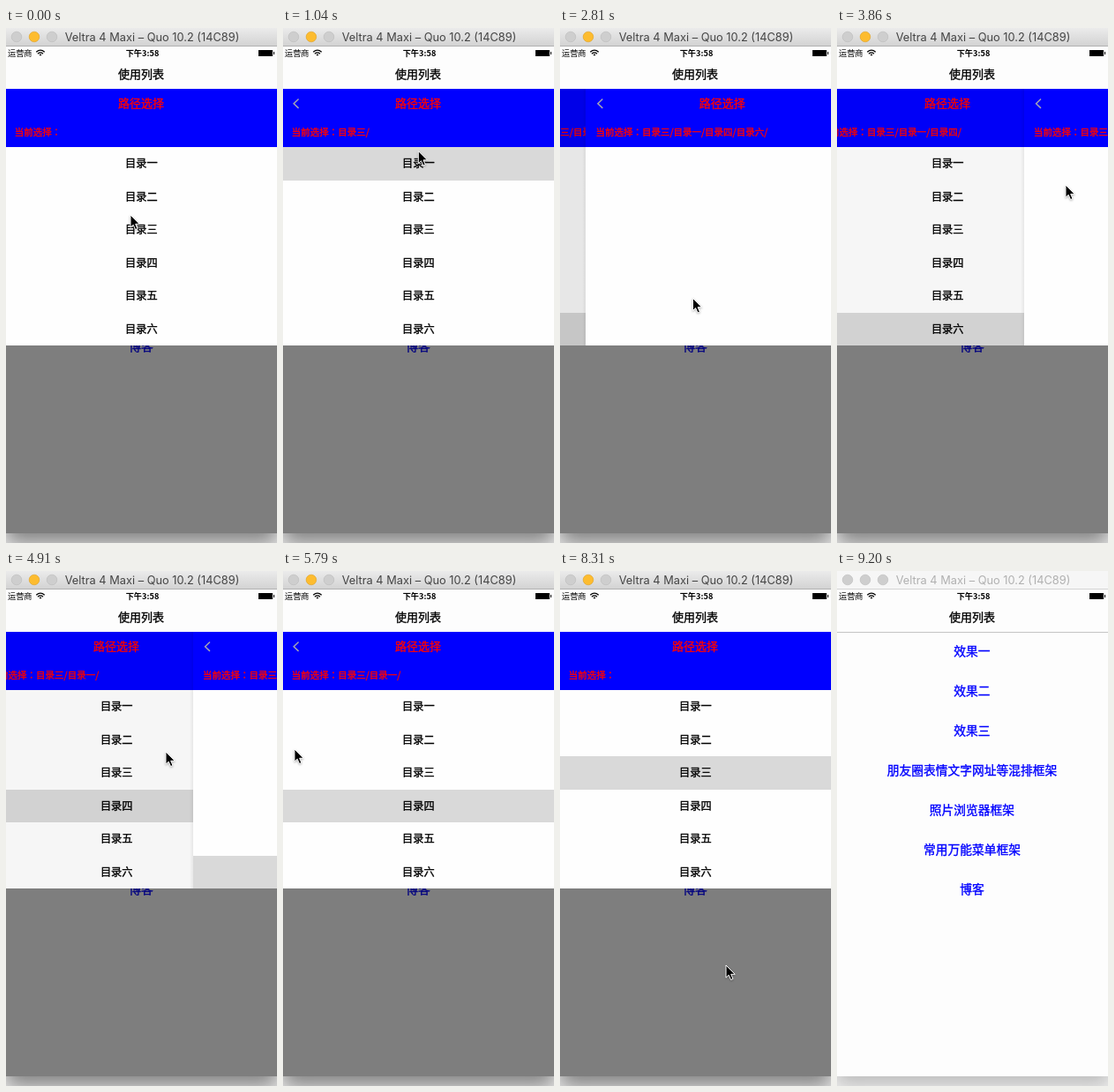
These frames come from a looping animation (307x584 px, 9300 ms). An HTML page:

```html
<!DOCTYPE html>
<html lang="zh-CN">
<head>
<meta charset="utf-8">
<style>
html, body { margin: 0; width: 100%; height: 100%; overflow: hidden; background: #ececec; }
#win { position: absolute; width: 307px; height: 573px; background: #fdfdfd; box-shadow: 0 11px 22px rgba(0,0,0,.46); }
#win.idle { box-shadow: 0 8px 20px rgba(0,0,0,.22); }
svg { position: absolute; left: 0; top: 0; }
rect { shape-rendering: crispEdges; }
text { font-family: "Noto Sans CJK SC", sans-serif; }
.mid { text-anchor: middle; }
.medium { stroke-width: .35; }
.title { font: 12.8px Inter, sans-serif; fill: #444; }
.idle .title { fill: #b0b0b0; }
.bar { fill: url(#chrome); }
.idle .bar { fill: #f6f6f6; }
.rim { fill: #b1b1b1; }
.idle .rim { fill: #d3d3d3; }
.dot { fill: #cecece; stroke: #bababa; stroke-width: .6; }
.min { fill: #fdbc2f; stroke: #e0a020; }
.idle .min { fill: #cecece; stroke: #bababa; }
#cursor { filter: drop-shadow(0 1px 1px rgba(0,0,0,.3)); }
</style>
</head>
<body>
<div id="win">
<svg width="307" height="584" viewBox="0 0 307 584">
  <defs>
    <linearGradient id="chrome" x2="0" y2="1"><stop stop-color="#ebebeb"/><stop offset="1" stop-color="#d3d3d3"/></linearGradient>
    <linearGradient id="edge"><stop stop-opacity="0"/><stop offset="1" stop-opacity=".06"/></linearGradient>
    <clipPath id="panel"><path d="M0 69H307V360H0Z"/></clipPath>
  </defs>

  <rect class="bar" width="307" height="20"/>
  <rect class="rim" y="20" width="307" height="1"/>
  <circle class="dot" cx="12" cy="10" r="5.8"/>
  <circle class="dot min" cx="32" cy="10" r="5.8"/>
  <circle class="dot" cx="52" cy="10" r="5.8"/>
  <text class="title mid" x="165.5" y="15">Veltra 4 Maxi – Quo 10.2 (14C89)</text>

  <text x="2" y="32.3" font-size="9.2">运营商</text>
  <g fill="none" stroke="#000" stroke-width="1.3">
    <path d="M34.3 27.3Q39 23 43.7 27.3M36 29.2Q39 26.6 42 29.2"/>
    <path d="M37.6 30.2Q39 29 40.4 30.2L39 31.8Z" fill="#000" stroke="none"/>
  </g>
  <text class="mid" x="154.5" y="32.2" font-size="9.2" font-weight="600">下午3:58</text>
  <rect x="286" y="25" width="16" height="7" rx="1"/>
  <rect x="303" y="27" width="1" height="3"/>
  <g id="list"></g>
  <rect y="69" width="307" height="1" fill="#c4c4c4"/>

  <g id="overlay">
    <path d="M0 69H307V573H0Z" fill-opacity=".5"/>
    <g id="pages" clip-path="url(#panel)"></g>
  </g>
  <path id="cursor" d="M0 0V14.2L3.2 11.2L5.6 16.6L8 15.5L5.7 10.3H10.2Z" stroke="#fff" stroke-width="1"/>
</svg>
</div>
<script>
const W = 307, TOP = 69, ROWS = 135, ROW = 37.5, LOOP = 9300, STEP = 148.5;
const $ = id => document.getElementById(id);
const label = (x, y, size, str, fill = '#000', cls = 'mid') =>
  `<text class="medium ${cls}" x="${x}" y="${y + size * .37}" font-size="${size}" fill="${fill}" stroke="${fill}">${str}</text>`;
const box = (y, h, attrs) => `<rect x="-1.5" y="${y}" width="310" height="${h}" ${attrs}/>`;

$('list').innerHTML = label(153, 52.4, 13, '使用列表') +
  ['效果一', '效果二', '效果三', '朋友圈表情文字网址等混排框架', '照片浏览器框架', '常用万能菜单框架', '博客']
    .map((s, i) => label(153, 91 + 45 * i, 13.75, s, '#00f')).join('');

const dirs = [...'一二三四五六'].map(n => '目录' + n);
const picks = [2, 0, 3, 5];             // row chosen on each level
const pushAt = picks.map((_, i) => 2 + 5 * i);
// swipes back: steps of start, end of drag and release, then where the drag ends
const swipes = [
  { from: 24, to: 26, drop: 28, x: 259, y: 178 },
  { from: 31, to: 33, drop: 34, x: 181, y: 205 },
  { from: 39, to: 41, drop: 43, x: 220, y: 202 },
  { from: 46, to: 49, drop: 51, x: 235, y: 193 },
];

function pageMarkup(level) {
  const path = picks.slice(0, level).map(p => dirs[p] + '/').join('');
  const colon = '<tspan lang="zh-Hant" font-family="Noto Sans CJK TC, sans-serif">：</tspan>';
  return `<g>
    <rect x="-5.5" y="${TOP}" width="4" height="291" fill="url(#edge)"/>
    ${box(TOP, 66, 'fill="#00f"')}
    ${box(ROWS, 225, 'fill="#fefefe"')}
    ${level ? '<path d="M17.6 80.5L12.2 85.7L17.6 90.9" fill="none" stroke="#a3a3b4" stroke-width="1.5"/>' : ''}
    ${label(153, 85.6, 13, '路径选择', '#f00')}
    ${label(9.7, 118.4, 10.5, '当前选择' + colon + path, '#f00', '')}
    ${box(ROWS + ROW * (picks[level] || 0), ROW, 'class="pick" fill="#d9d9d9"')}
    ${level < 4 ? dirs.map((s, i) => label(153.3, ROWS + ROW * (i + .5), 12.2, s)).join('') : ''}
    ${box(TOP, 291, 'class="dim"')}
  </g>`;
}
$('pages').innerHTML = [0, 1, 2, 3, 4].map(pageMarkup).join('');
const pages = [...$('pages').children];

const ramp = (k, a, b) => Math.min(1, Math.max(0, (k - a) / (b - a)));
const pushed = (k, s) => k < s ? 0 : k > s + 2 ? 1 : 1 - .1 ** (k - s);
const popped = (k, { from, to, drop }) => .695 * ramp(k, from, to) + .305 * ramp(k, drop - 1, drop + 1);
const sum = (list, f) => list.reduce((total, item) => total + f(item), 0);

// the pointer visits each chosen row, then swipes from the left edge
const stops = [];
picks.forEach((p, i) => {
  const x = 141 + 12.3 * i, y = ROWS + ROW * p + 2 + 2.5 * i;
  stops.push([pushAt[i] - 4, x, y], [pushAt[i], x, y]);
});
swipes.forEach(({ from, to, drop, x, y }, i) => {
  const ready = i ? swipes[i - 1].drop + 3 : from - 1;
  stops.push([ready, 13, y], [from, 13, y], [to, x, y], [drop + 1, x, y]);
});
stops.push([56, 188, 447], [58, 210, 486]);

function pointer(k) {
  const i = Math.max(1, stops.findIndex(s => s[0] > k));
  const last = k >= 58 ? stops.length - 1 : i;
  const a = stops[last - 1], b = stops[last], u = ramp(k, a[0], b[0]);
  return [1, 2].map(c => a[c] + (b[c] - a[c]) * u);
}

function draw(t) {
  // the screen refreshes in even steps
  const k = t < 310 ? 0 : Math.floor((t + 7) / STEP);
  const depth = sum(pushAt, s => pushed(k, s)) - sum(swipes, s => popped(k, s));

  pages.forEach((page, i) => {
    const d = i - depth;
    page.style.display = Math.abs(d) < .999 ? '' : 'none';
    page.setAttribute('transform', `translate(${d * W * (d > 0 ? 1 : .3)})`);
    page.querySelector('.dim').setAttribute('fill-opacity', Math.max(0, -d) * .1);
    page.querySelector('.pick').style.display = k >= pushAt[i] ? '' : 'none';
  });

  $('overlay').setAttribute('opacity', 1 - ramp(k, 56, 58));
  $('cursor').setAttribute('transform', `translate(${pointer(k)})`);
  $('cursor').style.display = k < 59 ? '' : 'none';
  $('win').className = k < 62 ? '' : 'idle';
}

const start = performance.now();
function tick() {
  draw((performance.now() - start) % LOOP);
  requestAnimationFrame(tick);
}
tick();
</script>
</body>
</html>
```
